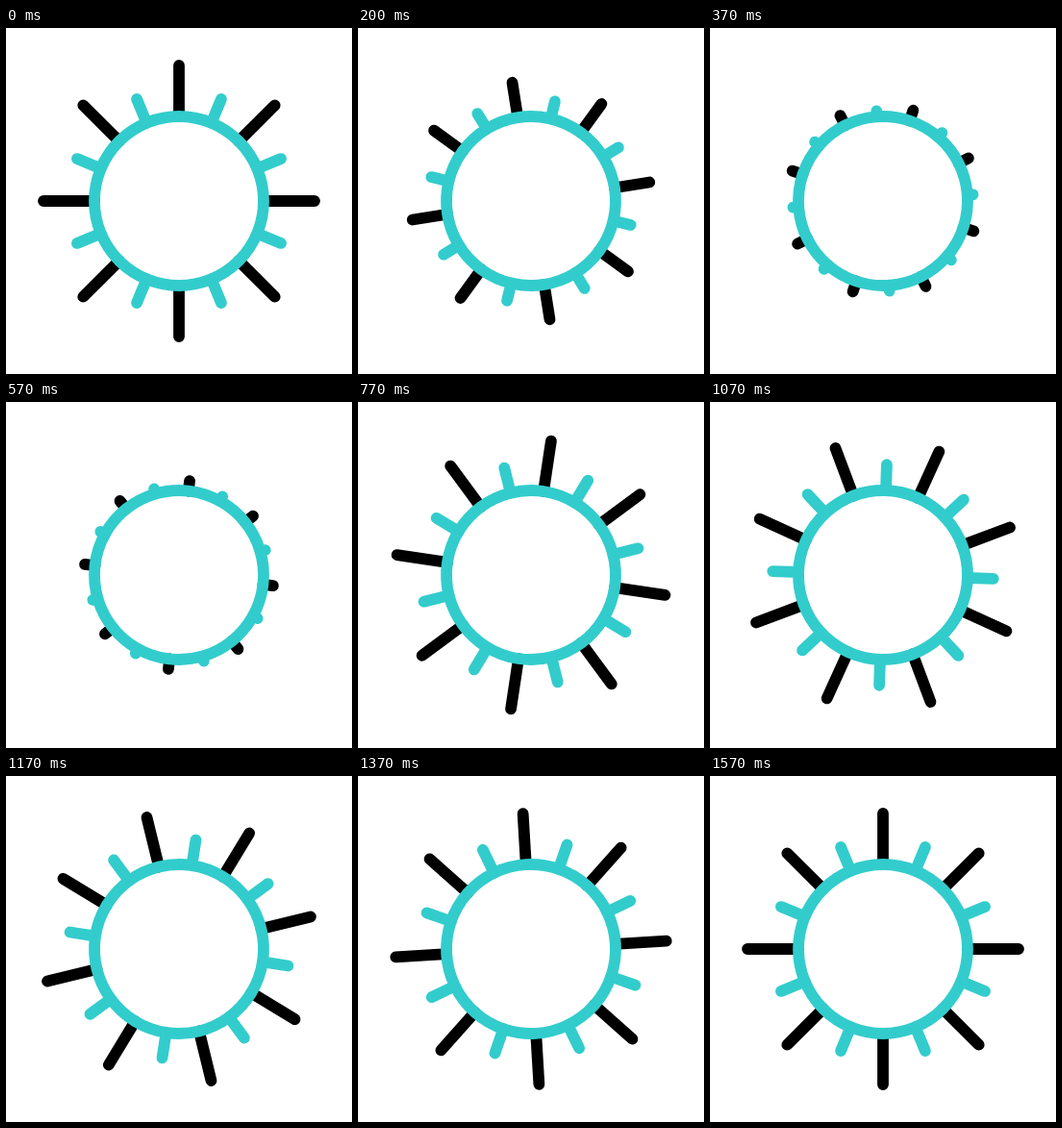
Recreate the animation shown at these times as an HTML page. Size 360 px wide and 360 px high, loop 1670 ms.

```html
<!DOCTYPE html>
<html lang="en">
<head>
<meta charset="utf-8">
<title>Sun</title>
<style>
  html, body { margin: 0; width: 100%; height: 100%; overflow: hidden; background: #fff; }
  svg { display: block; width: 100vw; height: 100vh; }
  path, circle { fill: none; stroke-width: 11.8; stroke-linecap: round; }
</style>
</head>
<body>
<svg viewBox="0 0 360 360">
  <g id="sun" transform="translate(180 180)">
    <path id="long" stroke="#000"/>
    <path id="short" stroke="#33cccc"/>
    <circle r="88" stroke="#33cccc"/>
  </g>
</svg>
<script>
const LOOP = 1670, STEP = 100 / 3, LAST = 47;
const RING = 88, LONG = 141, SHORT = 114.8;
const sun = document.getElementById('sun');
const longRays = document.getElementById('long');
const shortRays = document.getElementById('short');

// cubic-bezier(.42, 0, .58, 1)
function ease(x) {
  if (x <= 0) return 0;
  if (x >= 1) return 1;
  let lo = 0, hi = 1;
  for (let i = 0; i < 24; i++) {
    const s = (lo + hi) / 2, r = 1 - s;
    if (1.26 * r * r * s + 1.74 * r * s * s + s * s * s < x) lo = s; else hi = s;
  }
  return lo * lo * (3 - 2 * lo);
}

// Swings from 0 to 1 at the turn and back to 0 at the end.
function swing(n, turn, end) {
  return n < turn ? ease(n / turn) : 1 - ease((n - turn) / (end - turn));
}

function rays(tip, offset) {
  let d = '';
  for (let i = 0; i < 8; i++) {
    const a = (i * 45 + offset) * Math.PI / 180;
    const at = r => (r * Math.sin(a)).toFixed(3) + ' ' + (-r * Math.cos(a)).toFixed(3);
    d += 'M' + at(RING) + 'L' + at(tip);
  }
  return d;
}

function draw(ms) {
  const n = Math.min(LAST, Math.floor((ms + 3.5) / STEP));
  const turn = -38.8 * swing(n, 18, LAST);
  const size = 1 - 0.92 * swing(n, 15, 23);
  sun.setAttribute('transform', `translate(180 180) rotate(${turn.toFixed(3)})`);
  longRays.setAttribute('d', rays(RING + (LONG - RING) * size, 0));
  shortRays.setAttribute('d', rays(RING + (SHORT - RING) * size, 22.5));
}

const start = performance.now();
function tick() {
  draw((performance.now() - start) % LOOP);
  requestAnimationFrame(tick);
}
tick();
</script>
</body>
</html>
```
